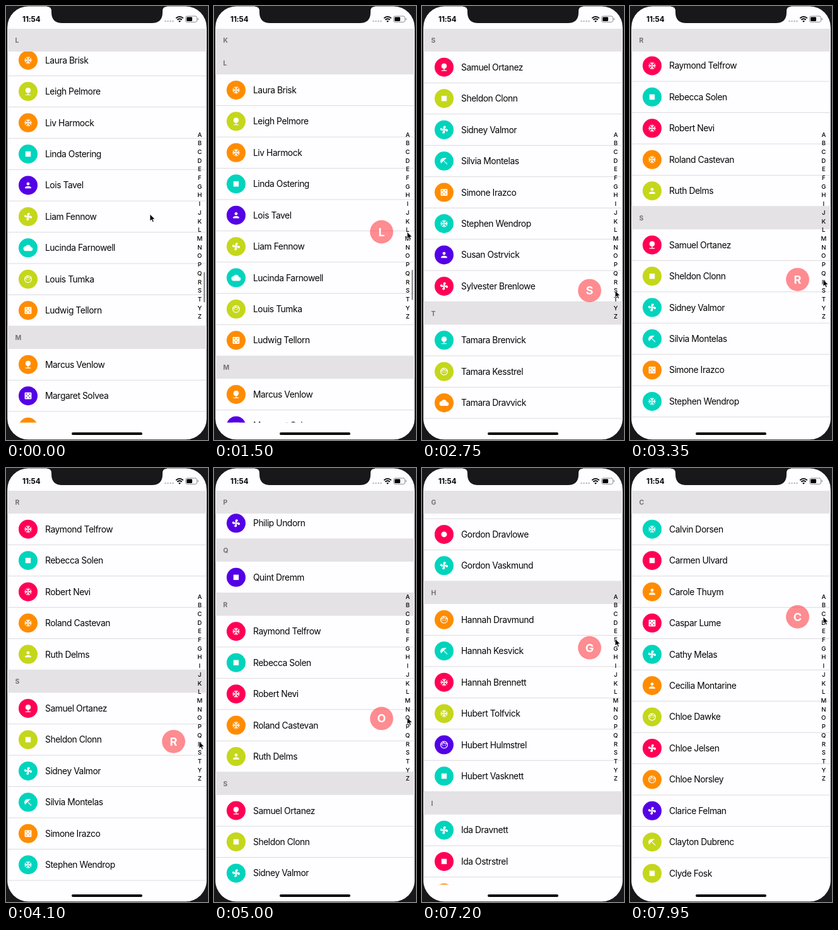
Animation of 320 by 686 pixels, one loop 8000 ms. Source, as an HTML page:

```html
<!DOCTYPE html>
<html lang="en">
<head>
<meta charset="utf-8">
<title>Contact list</title>
<style>
  html, body { margin: 0; width: 100%; height: 100%; overflow: hidden; background: #18171a; }
  svg { display: block; width: 100vw; height: 100vh; font-family: Inter, Roboto, sans-serif; }
  .name { font-size: 13.8px; letter-spacing: -.43px; fill: #050505; }
  .head { font-size: 10.5px; font-weight: 700; fill: #747276; }
  .index { font-size: 9.6px; font-weight: 500; text-anchor: middle; }
  .stroke { fill: none; stroke: #fff; stroke-width: 2; }
</style>
</head>
<body>
<svg viewBox="0 0 320 686">
  <defs>
    <clipPath id="view"><rect x="2" y="36" width="316" height="622.5"/></clipPath>
  </defs>
  <rect width="320" height="686" fill="#18171a"/>
  <rect x="2.200" y=".6" width="315.600" height="684.600" rx="33" fill="#fefdff"/>
  <path d="M65 0V1Q72 1 72 8V10Q72 27 89 27H231Q248 27 248 10V8Q248 1 255 1V0Z" fill="#18171a"/>

  <text x="26" y="25.200" font-size="11.600" font-weight="700" letter-spacing="-.1">11:54</text>
  <g fill="#bdbcc0">
    <circle cx="252.5" cy="24" r="1.3"/><circle cx="256.5" cy="24" r="1.3"/>
    <circle cx="260.5" cy="24" r="1.3"/><circle cx="264.5" cy="24" r="1.3"/>
  </g>
  <path d="M269.3 19.3a8 8 0 0 1 11.4 0M271.4 21.8a5 5 0 0 1 7.2 0" fill="none" stroke="#000" stroke-width="1.9"/>
  <path d="M273.2 23.9a2.6 2.6 0 0 1 3.6 0L275 25.8z"/>
  <rect x="284.5" y="16" width="18" height="9.5" rx="2.6" fill="none" stroke="#8c8b8f"/>
  <rect x="286" y="17.5" width="9" height="6.5" rx="1.2"/>
  <path d="M303.7 19v3.5q1.4-.5 1.4-1.75t-1.4-1.75z" fill="#8c8b8f"/>

  <g clip-path="url(#view)"><g id="rows"></g><g id="heads"></g></g>
  <rect id="thumb" x="313" width="2.4" rx="1.2" fill="#8f8e92"/>
  <g id="letters"></g>
  <g id="bubble">
    <circle cx="265.5" r="18.4" fill="#ff4248" fill-opacity=".6"/>
    <text id="picked" x="265.5" y="6.5" font-size="18" font-weight="700" fill="#fff" text-anchor="middle"></text>
  </g>
  <rect x="104" y="674" width="112" height="4" rx="2"/>
  <path id="cursor" d="M0 0V11L2.6 8.7 4.4 12.6 6.3 11.8 4.6 8H8z" stroke="#fff" stroke-width=".8"/>
</svg>

<script>
const LOOP = 8000, TOP = 36, VIEW = 623, HEAD = 36, ROW = 49.45;
const INDEX_TOP = 203, INDEX_STEP = 13.714;
const LETTERS = [...'ABCDEFGHIJKLMNOPQRSTYZ'];
const COLORS = { o: '#ff8c00', l: '#c4d71b', t: '#00d4bd', i: '#5400e6', r: '#ff0055' };

// Each entry ends with a colour key and an icon key.
const PEOPLE = {
  C: 'Calvin Dorsen ts|Carmen Ulvard ra|Carole Thuym op|Caspar Lume rk|Cathy Melas tf|Cecilia Montarine op|Chloe Dawke lh|Chloe Jelsen rf|Chloe Norsley oh|Clarice Felman if|Clayton Dubrenc lu|Clyde Fosk la',
  L: 'Laura Brisk os|Leigh Pelmore lt|Liv Harmock os|Linda Ostering ta|Lois Tavel ip|Liam Fennow lf|Lucinda Farnowell tc|Louis Tumka lh|Ludwig Tellorn ok',
  M: 'Marcus Venlow ot|Margaret Solvea ik|Martin Esterow ok|Maurice Tolfnett ts|Melissa Dravlowe rp|Mildred Kesvick lc|Morton Hulmstrel if|Muriel Wenlowe oh',
  N: 'Natascha Vold lp|Nehemiah Tarrow ld|Nehemiah Quelby ra|Nicolina Brund id|Norma Haldew ls',
  O: 'Ophelia Tarns ih',
  P: 'Paulina Crandow ld|Penelope Wynd ok|Philip Undorn if',
  Q: 'Quint Dremm ia',
  R: 'Raymond Telfrow rs|Rebecca Solen ta|Robert Nevi rs|Roland Castevan os|Ruth Delms lp',
  S: 'Samuel Ortanez rt|Sheldon Clonn la|Sidney Valmor tf|Silvia Montelas tu|Simone Irazco ok|Stephen Wendrop ts|Susan Ostrvick ip|Sylvester Brenlowe rf'
};
// Sections without a list get three made-up people per first name.
const FIRST = {
  A: 'Agnes Alma Anton Arthur', B: 'Barbara Bruno', D: 'Daphne Dennis Doris', E: 'Edith Elmer Esther',
  F: 'Felix Flora', G: 'Gerda Gordon', H: 'Hannah Hubert', I: 'Ida Ingrid',
  J: 'Jacob Jasper Joanna Judith', K: 'Karen Kenneth Klara', T: 'Tamara Theodor Tobias', Y: 'Yvette', Z: 'Zelda'
};
const SUR_START = ['Bren', 'Tolf', 'Vask', 'Hulm', 'Kes', 'Drav', 'Wen', 'Ostr'];
const SUR_END = ['dorn', 'vick', 'lowe', 'nett', 'mund', 'strel'];

const dot = (x, y, r, fill = '#fff') => `<circle cx="${x}" cy="${y}" r="${r}" fill="${fill}"/>`;
const line = d => `<path class="stroke" d="${d}"/>`;
const shape = d => `<path fill="#fff" d="${d}"/>`;
const spin = part => [0, 90, 180, 270].map(a => `<g transform="rotate(${a} 12 12)">${part}</g>`).join('');
const ICONS = {
  s: spin(line('M12 12V2M7 3.6l5 5 5-5')),
  t: shape('M13 16.1c3.4-.5 6-3.4 6-6.9a7 7 0 1 0-8 6.9V20H5v2h14v-2h-6z'),
  a: '<rect x="5" y="5" width="14" height="14" fill="#fff"/>',
  d: dot(12, 12, 7.5),
  p: dot(12, 8, 4) + shape('M4 20v-2c0-2.7 5.3-4 8-4s8 1.3 8 4v2z'),
  f: spin(shape('M12 13C9 9 9 3 12.5 2 16 1 18 5 15.5 7 13.5 8.500 13.500 10.500 12 13z')),
  c: shape('M19.35 10A7.5 7.5 0 0 0 5.3 8 6 6 0 0 0 6 20h13a5 5 0 0 0 .35-10z'),
  h: line('M21 12a9 9 0 1 1-18 0 9 9 0 0 1 18 0zM3.5 11Q9 10 10.5 5.5 14 10 20.5 9.5')
    + dot(9, 13.3, 1.4) + dot(15, 13.3, 1.4),
  k: '<rect x="3" y="3" width="18" height="18" rx="2" fill="#fff"/>'
    + dot(12, 12, 1.6, 'currentColor') + spin(dot(7.5, 7.5, 1.6, 'currentColor')),
  u: shape('M4.5 18.5C.5 13 2 6.5 8 4.5 12.5 3 17 3.5 18.5 4.5L13 8.5 11.5 11.5 8.5 13z') + line('M12 12l8.5 8.5')
};

let seed = 7;
function pick(items) {
  seed = seed * 16807 % 2147483647;
  return items[seed % items.length];
}

function peopleIn(letter) {
  if (PEOPLE[letter])
    return PEOPLE[letter].split('|').map(p => [p.slice(0, -3), p.at(-2), p.at(-1)]);
  return FIRST[letter].split(' ').flatMap(first => [1, 2, 3].map(() =>
    [`${first} ${pick(SUR_START)}${pick(SUR_END)}`, pick(Object.keys(COLORS)), pick(Object.keys(ICONS))]));
}

function rowMarkup(y, [name, color, icon]) {
  const mid = y + ROW / 2;
  return `<circle cx="35" cy="${mid}" r="15" fill="${COLORS[color]}"/>
    <g transform="translate(27.8 ${mid - 7.2}) scale(.6)" color="${COLORS[color]}">${ICONS[icon]}</g>
    <text class="name" x="62" y="${mid + 5}">${name}</text>
    <rect x="2" y="${y + ROW - .5}" width="316" height=".9" fill="#d8d7da"/>`;
}

const $ = id => document.getElementById(id);
const starts = [0];
let rows = '', heads = '', letters = '';
LETTERS.forEach((letter, s) => {
  const people = peopleIn(letter);
  people.forEach((p, i) => rows += rowMarkup(starts[s] + HEAD + i * ROW, p));
  starts.push(starts[s] + HEAD + people.length * ROW);
  heads += `<g><rect x="2" width="316" height="${HEAD}" fill="#e4e2e4"/><text class="head" x="14.5" y="22">${letter}</text></g>`;
  letters += `<text class="index" x="306.8" y="${INDEX_TOP + s * INDEX_STEP + 3.5}">${letter}</text>`;
});
$('rows').innerHTML = rows;
$('heads').innerHTML = heads;
$('letters').innerHTML = letters;
const total = starts.at(-1);
$('thumb').setAttribute('height', VIEW * VIEW / total);

// Drags along the index: start, duration, place counted in letters.
const DRAGS = [
  [880, 340, 10.4], [1227, 60, 11.23], [1755, 700, 18], [2821, 300, 16.72],
  [4774, 145, 13.95], [5600, 200, 12.83], [6250, 1400, 2.35]
];
const TOUCH_START = 1200, TOUCH_LAG = 100, SCROLL_LAG = 66, SCROLL_SETTLE = 190;

const clamp = x => Math.min(1, Math.max(0, x));
const ease = x => clamp(x) ** 2 * (3 - 2 * clamp(x));
const indexY = place => INDEX_TOP + place * INDEX_STEP;

function follow(t, from, extra = 0, snap = x => x) {
  return DRAGS.reduce((place, [start, length, to]) =>
    place + (snap(to) - place) * ease((t - start) / (length + extra)), from);
}

const move = (el, x, y) => el.setAttribute('transform', `translate(${x} ${y})`);

function draw(t) {
  const place = follow(t - SCROLL_LAG, 11.023, SCROLL_SETTLE, Math.round);
  const section = Math.floor(place);
  const offset = starts[section] + (place - section) * (starts[section + 1] - starts[section]);
  move($('rows'), 0, TOP - offset);
  [...$('heads').children].forEach((head, s) => {
    const stuck = Math.min(Math.max(starts[s], offset), starts[s + 1] - HEAD);
    move(head, 0, TOP + stuck - offset);
  });
  $('thumb').setAttribute('y', TOP + offset / total * VIEW);
  $('thumb').setAttribute('opacity', clamp((1950 - t) / 300));

  const reach = ease((t - DRAGS[0][0]) / DRAGS[0][1]);
  move($('cursor'), 228 + 78 * reach, indexY(follow(t, 9.19)));
  const touch = follow(t - TOUCH_LAG, 9.19);
  move($('bubble'), 0, indexY(touch));
  $('bubble').setAttribute('visibility', t < TOUCH_START ? 'hidden' : 'visible');
  $('picked').textContent = LETTERS[Math.round(touch)];
}

const begin = performance.now();
function tick() {
  draw((performance.now() - begin) % LOOP);
  requestAnimationFrame(tick);
}
tick();
</script>
</body>
</html>
```
